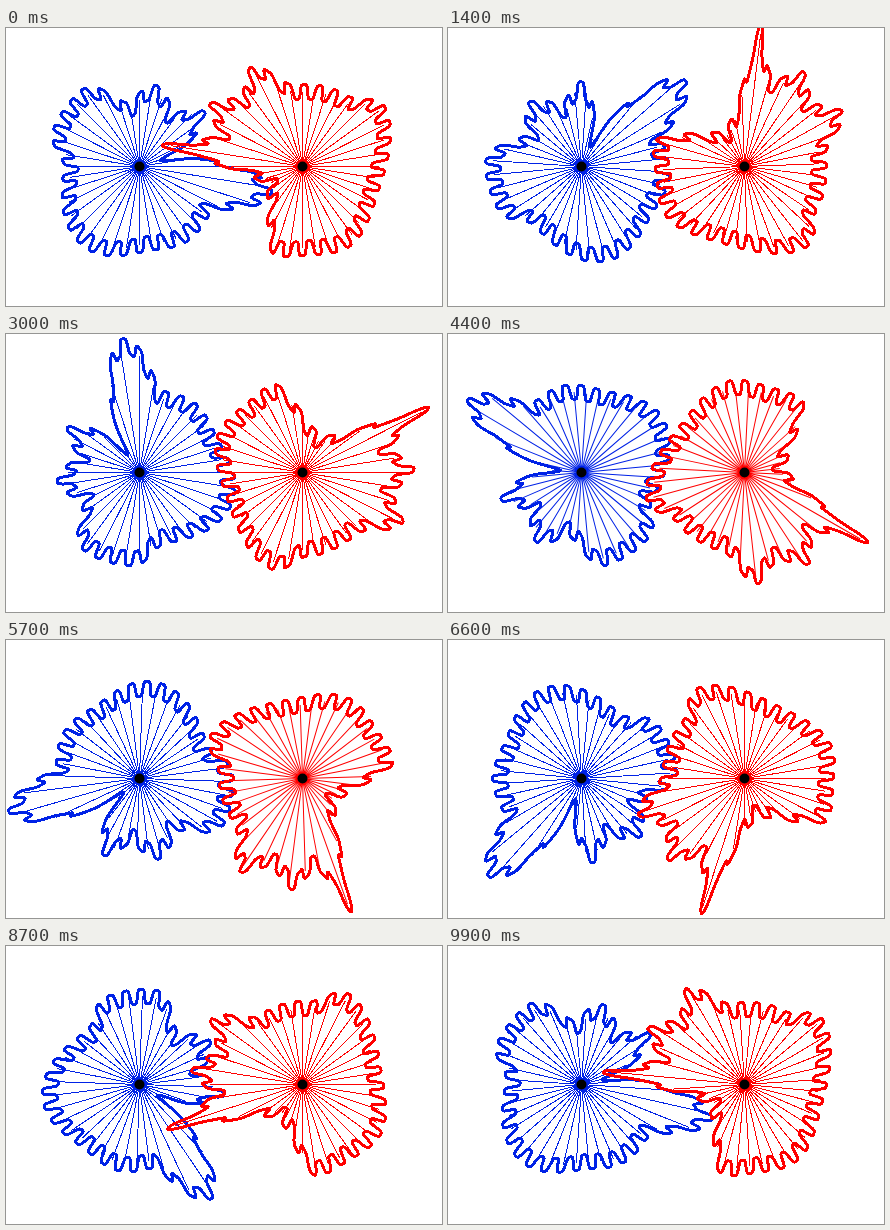
An HTML page that plays this animation: 436 by 278 pixels, repeating every 10000 ms.

```html
<!DOCTYPE html>
<html lang="en">
<head>
<meta charset="utf-8">
<title>Non-circular gears</title>
<style>
  html, body { margin: 0; width: 100%; height: 100%; overflow: hidden; background: #fff; }
  svg { display: block; width: 436px; height: 278px; }
  path { fill: none; stroke-linejoin: round; shape-rendering: crispEdges; }
  .rim { stroke-width: 3; }
  .spokes { stroke-width: 1; }
  .blue { stroke: #0022e6; }
  .red { stroke: #f00; }
</style>
</head>
<body>
<svg viewBox="0 0 436 278">
  <g id="driver" class="blue"><path class="spokes"/><path class="rim"/></g>
  <g id="follower" class="red"><path class="spokes"/><path class="rim"/></g>
  <circle cx="133.5" cy="138.5" r="5"/>
  <circle cx="296.5" cy="138.5" r="5"/>
</svg>
<script>
const LOOP = 10000, STEP = 100;
const CENTER_Y = 138.5, DRIVER_X = 133.5, FOLLOWER_X = 296.5;
const DISTANCE = FOLLOWER_X - DRIVER_X;
const TEETH = 33, TOOTH_HEIGHT = 7.3, SPOKES = 40;
const PER_DEGREE = 8, COUNT = 360 * PER_DEGREE;

// Crests and hollows of the driver's pitch curve: angle in degrees, radius.
const EXTREMES = [
  [-11, 127], [16, 28], [40, 77], [57, 58], [79, 75], [100, 57], [126, 88],
  [158, 86], [179, 68], [237, 90], [278, 77], [303, 81], [326, 77], [349, 127]
];
const PEAK = EXTREMES[0][0];

function pitchAt(angle) {
  const i = Math.max(1, EXTREMES.findIndex(([a]) => a >= angle));
  const [a0, r0] = EXTREMES[i - 1], [a1, r1] = EXTREMES[i];
  const u = (angle - a0) / (a1 - a0);
  return r0 + (r1 - r0) * u * u * (3 - 2 * u);
}

function runningSum(values) {
  let sum = 0;
  return [0, ...values.slice(1).map((v, i) => sum += (v + values[i]) / 2 / PER_DEGREE)];
}

const angles = Array.from({ length: COUNT + 1 }, (_, i) => PEAK + i / PER_DEGREE);
const base = angles.map(pitchAt);
const rollAngles = offset =>
  runningSum(base.map(r => (r + offset) / (DISTANCE - r - offset)));

// Shift the curve until both gears close after one turn.
let low = -8, high = 8;
for (let i = 0; i < 40; i++) {
  const mid = (low + high) / 2;
  if (rollAngles(mid)[COUNT] < 360) low = mid; else high = mid;
}
const roll = rollAngles(low);
const radii = base.map(r => r + low);

// Teeth are evenly spaced along the tangential travel, which both gears share.
const travel = runningSum(radii);
const toothOffset = travel.map(s => {
  const wave = Math.cos(2 * Math.PI * TEETH * s / travel[COUNT]);
  return TOOTH_HEIGHT * Math.tanh(2.4 * wave) / Math.tanh(2.4);
});

function rollAt(angle) {
  const x = (((angle - PEAK) % 360) + 360) % 360 * PER_DEGREE;
  const i = Math.floor(x), next = Math.min(i + 1, COUNT);
  return roll[i] + (roll[next] - roll[i]) * (x - i);
}

function point(radius, degrees) {
  const a = degrees * Math.PI / 180;
  return (radius * Math.cos(a)).toFixed(2) + " " + (-radius * Math.sin(a)).toFixed(2);
}

function buildGear(id, radiusAt, angleAt, toothSign) {
  let rim = "", spokes = "";
  const sector = i => Math.floor(angleAt(i) * SPOKES / 360);
  for (let i = 0; i < COUNT; i++) {
    const r = radiusAt(i), a = angleAt(i);
    rim += (i ? "L" : "M") + point(r + toothSign * toothOffset[i], a);
    if (sector(i) !== sector(i + 1)) spokes += "M0 0L" + point(r, a);
  }
  const gear = document.getElementById(id);
  gear.querySelector(".rim").setAttribute("d", rim + "Z");
  gear.querySelector(".spokes").setAttribute("d", spokes);
  return gear;
}

const driver = buildGear("driver", i => radii[i], i => angles[i], 1);
const follower = buildGear("follower",
  i => DISTANCE - radii[i], i => 180 + rollAt(0) - roll[i], -1);

function place(gear, x, turn) {
  gear.setAttribute("transform", `translate(${x} ${CENTER_Y}) rotate(${-turn})`);
}

function draw(time) {
  const step = Math.floor((time % LOOP) / STEP);
  const turn = 360 * step * STEP / LOOP;
  place(driver, DRIVER_X, turn);
  place(follower, FOLLOWER_X, rollAt(-turn) - rollAt(0));
}

const start = performance.now();
function tick() {
  draw(performance.now() - start);
  requestAnimationFrame(tick);
}
tick();
</script>
</body>
</html>
```
